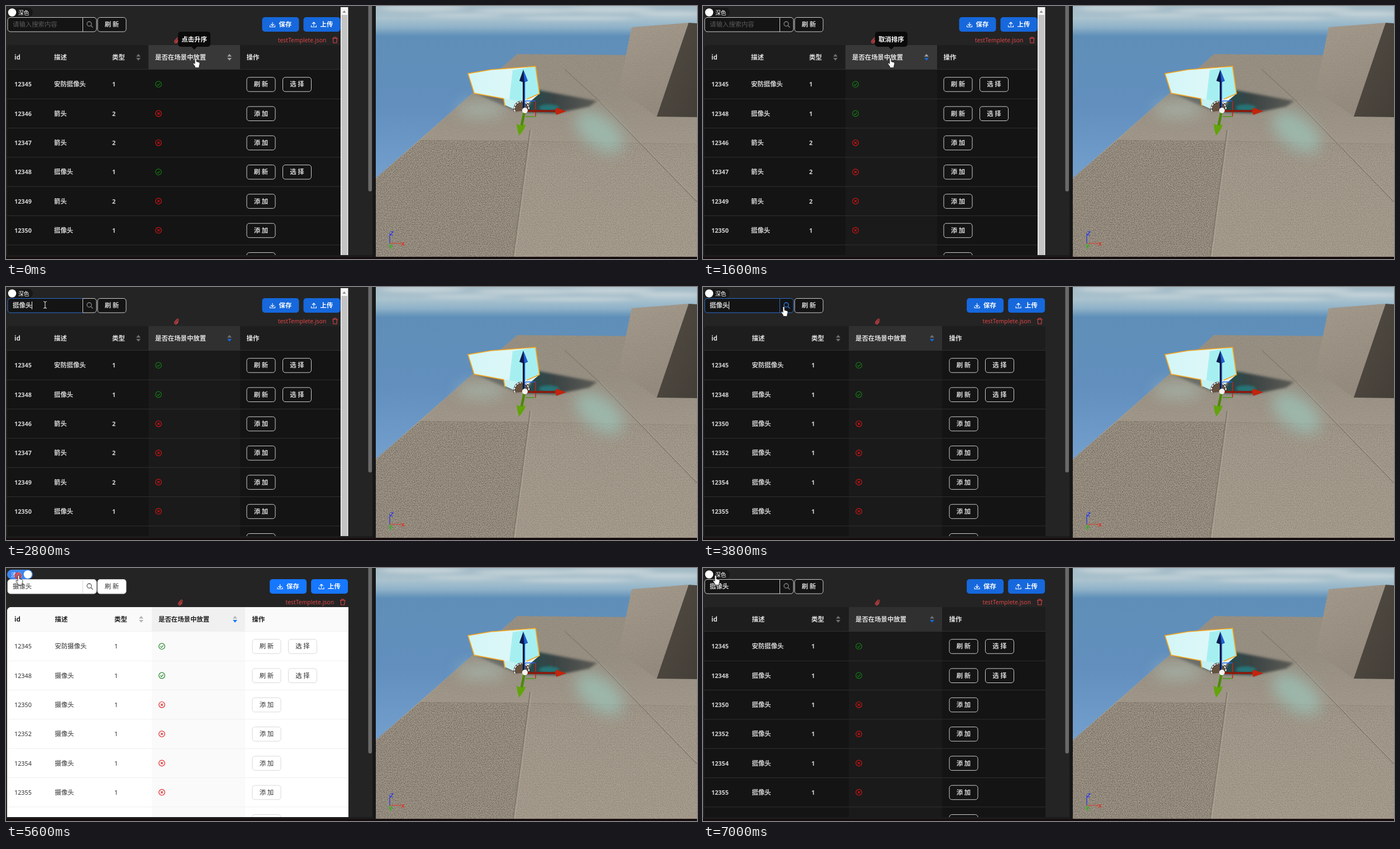
Animation of 1237 by 453 pixels, one loop 7.2 s. Source, as an HTML page:

```html
<!DOCTYPE html>
<html lang="zh">
<head>
<meta charset="utf-8">
<title>Scene table</title>
<style>
html, body { margin: 0; width: 100%; height: 100%; overflow: hidden; background: #242424; }
svg { display: block; width: 100vw; height: 100vh; }
text { font-family: "Noto Sans CJK SC", "Noto Sans CJK", "Noto Sans", sans-serif; font-size: 11.4px; white-space: pre; }
text.num { font-family: "Noto Sans", sans-serif; font-size: 10.8px; }
text.file { font-family: "Noto Sans", sans-serif; font-size: 10.4px; }
</style>
</head>
<body>
<svg viewBox="0 0 1237 453" preserveAspectRatio="none">
  <defs>
    <clipPath id="view"><rect x="662" width="575" height="449"/></clipPath>
    <clipPath id="page"><rect width="647" height="446"/></clipPath>
    <linearGradient id="sky" x1="0" y1="0" x2="0" y2="1">
      <stop offset="0" stop-color="#a3bac5"/><stop offset=".05" stop-color="#a9c2ce"/>
      <stop offset=".085" stop-color="#8fb2c8"/><stop offset=".12" stop-color="#5f8fb8"/>
      <stop offset=".4" stop-color="#628fbe"/><stop offset=".7" stop-color="#74a0ce"/>
    </linearGradient>
    <linearGradient id="floor" x1="0" y1=".19" x2="0" y2="1">
      <stop offset="0" stop-color="#9a9285"/><stop offset=".4" stop-color="#a79e90"/>
      <stop offset="1" stop-color="#aba192"/>
    </linearGradient>
    <linearGradient id="block" x1="0" y1="0" x2=".3" y2="1">
      <stop offset="0" stop-color="#a79d8f"/><stop offset="1" stop-color="#978d80"/>
    </linearGradient>
    <linearGradient id="side" x1="0" y1="0" x2="1" y2="1">
      <stop offset="0" stop-color="#544e46"/><stop offset="1" stop-color="#443f38"/>
    </linearGradient>
    <linearGradient id="mesh"><stop offset="0" stop-color="#d3f6f7"/><stop offset="1" stop-color="#e4f8f9"/></linearGradient>
    <linearGradient id="shade">
      <stop offset="0" stop-color="#1f4a4e"/><stop offset=".4" stop-color="#3a4343"/><stop offset="1" stop-color="#5d5c56"/>
    </linearGradient>
    <filter id="grain" x="0" y="0" width="1" height="1" color-interpolation-filters="sRGB">
      <feTurbulence type="fractalNoise" baseFrequency=".8" numOctaves="1" seed="4"/>
      <feColorMatrix values="0 0 0 0 .2  0 0 0 0 .17  0 0 0 0 .14  0 2.4 0 0 -1.05"/>
      <feComposite operator="in" in2="SourceAlpha"/>
    </filter>
    <filter id="b2" x="-20%" y="-30%" width="140%" height="160%"><feGaussianBlur stdDeviation="2"/></filter>
    <filter id="b9" x="-60%" y="-90%" width="220%" height="280%"><feGaussianBlur stdDeviation="13"/></filter>
    <filter id="cloud" x="-20%" y="-200%" width="140%" height="500%"><feGaussianBlur stdDeviation="9 3"/></filter>
  </defs>
  <g clip-path="url(#view)">
    <rect x="662" width="575" height="449" fill="url(#sky)"/>
    <g filter="url(#cloud)" fill="#d3dcdf" opacity=".65">
      <ellipse cx="745" cy="4" rx="75" ry="6"/><ellipse cx="930" cy="8" rx="90" ry="5"/>
      <ellipse cx="1080" cy="6" rx="80" ry="6"/><ellipse cx="1190" cy="14" rx="60" ry="5"/>
      <ellipse cx="820" cy="17" rx="70" ry="3"/><ellipse cx="1020" cy="22" rx="100" ry="3"/>
    </g>
    <path d="M915 86L1237 89V449H662V308Z" fill="url(#floor)"/>
    <path d="M742 240L936 241L908 449H662V308Z" fill="#a1988a"/>
    <g filter="url(#grain)">
      <path d="M915 86L1237 89V247L742 240Z" opacity=".2"/>
      <path d="M742 240L936 241L908 449H662V308Z" opacity=".75"/>
      <path d="M936 241L1237 247V449H908Z" opacity=".4"/>
    </g>
    <path d="M742 240L1237 247" stroke="#8d8578" stroke-opacity=".5"/>
    <path d="M938 222L908 449" fill="none" stroke="#7c7468" stroke-width="1.5"/>
    <path d="M941 222L911 449" fill="none" stroke="#bdb4a5" stroke-opacity=".6"/>
    <path d="M1000 113L1062 170L1237 351" fill="none" stroke="#827a6e" stroke-width="1.4"/>
    <path d="M1064 170L1237 348" stroke="#bdb4a5" stroke-opacity=".5"/>
    <ellipse cx="1062" cy="225" rx="50" ry="28" transform="rotate(38 1062 225)" fill="#9cc9be" opacity=".65" filter="url(#b9)"/>
    <ellipse cx="850" cy="185" rx="45" ry="14" fill="#b0cdc5" opacity=".5" filter="url(#b9)"/>
    <path d="M840 156L893 164L918 190L890 178Z" fill="#5b605d" opacity=".75" filter="url(#b2)"/>
    <path d="M950 150L1058 170L1044 180L985 192L930 190Z" fill="url(#shade)" filter="url(#b2)"/>
    <ellipse cx="972" cy="182" rx="18" ry="6" fill="#248083" opacity=".8" filter="url(#b2)"/>
    <path d="M1120 38L1222 30L1165 198L1097 150Z" fill="url(#block)"/>
    <path d="M1222 30L1237 31V199L1165 198Z" fill="url(#side)"/>
    <path d="M1120 38L1222 30L1237 31V199L1165 198L1097 150Z" filter="url(#grain)" opacity=".2"/>
    <path d="M827 121L868 114L948 108L955 157L918 188L893 177L891 166L838 156Z" fill="url(#mesh)"/>
    <path d="M907 115L948 108L955 157L918 171L901 167Z" fill="#a6eff1"/>
    <path d="M891 166L901 167L918 171L930 168L918 188L893 177Z" fill="#c4f1f2"/>
    <path d="M893 179L891 166L838 156L827 121L868 114L948 108L955 157L932 167" fill="none" stroke="#f4a51c" stroke-width="1.7"/>
    <path d="M911 189A13 13 0 1 1 936 186L929 188Z" fill="#65503f"/>
    <path d="M911 189A13 13 0 1 1 936 186" fill="none" stroke="#201c18" stroke-width="3.200"/>
    <path d="M911 189A13 13 0 1 1 936 186" fill="none" stroke="#fff" stroke-width="2" stroke-dasharray="4 1.2"/>
    <path d="M930 170H948" stroke="#2060e8" stroke-width="1.5"/>
    <path d="M948 170V198" stroke="#d01e10" stroke-width="1.5"/>
    <path d="M930 198H948" stroke="#4c9a14" stroke-width="1.5"/>
    <path d="M927 134V185" stroke="#0b1738" stroke-width="4"/>
    <path d="M928.5 134V183" stroke="#1c58cc" stroke-width="1.5"/>
    <path d="M926 114L919 134L927 137L934 134Z" fill="#0c1c4c"/>
    <path d="M926 114L928 136L934 134Z" fill="#205fd8"/>
    <path d="M932 188H986" stroke="#8e1608" stroke-width="3.5"/>
    <path d="M1003 188.500L985 182L983 188L985 195Z" fill="#c2240c"/>
    <path d="M928 190L923 214" stroke="#4c8908" stroke-width="4.5"/>
    <path d="M914 211L922 214L930 212L928 219L919 232L916 224Z" fill="#62a40a"/>
    <circle cx="929" cy="187" r="5" fill="#f4f4f2"/>
    <g fill="none" stroke-width="1.2">
      <path d="M687 425V407M688 404H693L688 410H693" stroke="#2436e8"/>
      <path d="M687 425H707M708 423L713 429M713 423L708 429" stroke="#e03424"/>
      <path d="M685 428L688 431L692 428M688 431V435M687 425L690 434" stroke="#35b024"/>
    </g>
  </g>
  <path d="M656 0H662V449H656Z" fill="#171717"/>
  <rect x="648.500" y="-8" width="6.500" height="340" rx="3" fill="#6a6a6a"/>
  <g id="ui" clip-path="url(#page)"></g>
  <path d="M0 446H656V449H0Z" fill="#1b1b1b"/>
  <path d="M0 449.500H1237V453H0Z" fill="#150b0c"/>
  <g id="pointer"></g>
</svg>
<script>
const LOOP = 7200, STEP = 200;
const ui = document.getElementById('ui'), pointer = document.getElementById('pointer');

const CAMERA = '摄像头', ARROW = '箭头';
const items = Array.from({ length: 14 }, (_, i) => {
  const arrow = [1, 2, 4, 6, 8].includes(i);
  return {
    id: 12345 + i, name: i ? (arrow ? ARROW : CAMERA) : '安防' + CAMERA,
    type: arrow ? 2 : 1, placed: i === 0 || i === 3
  };
});

const darkTheme = {
  body: '#141414', head: '#1d1d1d', hot: '#303030', col: '#1a1a1a', line: '#303030',
  text: '#d4d4d4', title: '#e0e0e0', edge: '#cfcfcf', weight: 600, blue: '#1668dc',
  caret: '#707070', good: '#147a14', bad: '#d41414', hint: '#5a5a5a', icon: '#858585'
};
const lightTheme = {
  body: '#ffffff', head: '#fafafa', hot: '#f0f0f0', col: '#fafafa', line: '#f0f0f0',
  text: '#303030', title: '#202020', edge: '#d9d9d9', weight: 400, blue: '#1677ff',
  caret: '#b4b4b4', good: '#258a2c', bad: '#dc2626', hint: '#bbbbbb', icon: '#606060'
};

const rect = (x, y, w, h, fill, more = '') =>
  `<rect x="${x}" y="${y}" width="${w}" height="${h}" fill="${fill}" ${more}/>`;
const text = (x, cy, s, fill, more = '') =>
  `<text x="${x}" y="${cy + 4.2}" fill="${fill}" ${more}>${s}</text>`;
const line = (d, color, w = 1.1, more = '') =>
  `<path d="${d}" fill="none" stroke="${color}" stroke-width="${w}" ${more}/>`;

function button(x, cy, label, c) {
  return rect(x + .5, cy - 12.5, 51, 25.5, c.body, `rx="4.5" stroke="${c.edge}"`) +
    text(x + 26, cy, label, c.text, `text-anchor="middle" font-weight="${c.weight}"`);
}

function blueButton(x, label, c, up) {
  const d = up ? 'M0 3V-4M-3 -1L0 -4L3 -1' : 'M0 -4V2.500M-3 -.5L0 2.500L3 -.5';
  return rect(x, 20, 66, 26, c.blue, 'rx="5"') +
    `<g transform="translate(${x + 18.5} 33)">${line(d + 'M-4.500 1.500V4.500H4.500V1.500', '#fff')}</g>` +
    text(x + 30, 33, label, '#fff', 'font-weight="600"');
}

function sorter(x, c, order, hover) {
  const off = hover ? '#a0a0a0' : c.caret;
  const tint = side => order === side ? c.blue : off;
  return `<path d="M${x - 4} 90.500h8l-4 -4.700z" fill="${tint('up')}"/>` +
    `<path d="M${x - 4} 93h8l-4 4.700z" fill="${tint('down')}"/>`;
}

function mark(x, cy, ok, c) {
  const d = ok ? `M${x - 2.6} ${cy}l2 2.200l3.300 -4` : `M${x - 2} ${cy - 2}l4 4m0 -4l-4 4`;
  const color = ok ? c.good : c.bad;
  return `<circle cx="${x}" cy="${cy}" r="5.300" fill="none" stroke="${color}" stroke-width="1.2"/>` + line(d, color, 1.2);
}

function toggle(light) {
  const bg = light ? '#3d86ee' : '#171717';
  return rect(2, 3, 46, 17, bg, 'rx="8.500"') +
    `<circle cx="${light ? 39 : 11}" cy="11.500" r="7.300" fill="#fff"/>` +
    text(light ? 9 : 22, 11.5, light ? '浅色' : '深色', '#fff', 'style="font-size:9.800px"');
}

function searchBar(s, c) {
  const edge = s.focus ? '#2b6fd0' : c.edge;
  return `<path d="M137.500 20.500H8a5 5 0 0 0 -5 5V41a5 5 0 0 0 5 5H137.500Z" fill="${c.body}" stroke="${edge}"/>` +
    `<path d="M137.500 20.500H157a5 5 0 0 1 5 5V41a5 5 0 0 1 -5 5H137.500Z" fill="${c.body}" stroke="${s.hotSearch ? '#2b6fd0' : c.edge}"/>` +
    text(12, 33, s.query || '请输入搜索内容', s.query ? c.text : c.hint, s.query ? `font-weight="${c.weight}"` : '') +
    (s.caret ? line(`M${s.query ? 46.500 : 12.500} 26V40`, '#eee', 1) : '') +
    line('M152.200 35.200L155.500 38.500M153 32a4 4 0 1 0 -8 0a4 4 0 1 0 8 0', s.hotSearch ? '#2f7ae5' : c.icon, 1.3) +
    button(163.5, 33, '刷 新', c);
}

function fileRow(wide) {
  const x = wide ? 313 : 306, dx = wide ? 13.7 : 0, red = '#dc4446';
  return `<g transform="translate(${x} 61.500) rotate(40)">` +
    line('M2.500 -1V3A2.500 2.500 0 0 1 -2.500 3V-3A1.800 1.800 0 0 1 1 -3V2.500A.6 .6 0 0 1 -.8 2.500V-2', red) + '</g>' +
    text(486.7 + dx, 61, 'testTemplete.json', red, 'class="file"') +
    `<g transform="translate(${589 + dx} 61)">` + line('M-5 -3H5M-2 -3V-5H2V-3M-3.600 -3L-3 5H3L3.600 -3', red) + '</g>';
}

function tooltip(label) {
  return '<path d="M331 72H343L337 78Z" fill="#0a0a0a"/>' + rect(308, 46, 58, 27, '#0a0a0a', 'rx="5"') +
    text(337, 60, label, '#fff', 'text-anchor="middle" font-weight="600"');
}

function pageScroll() {
  return rect(599, 2, 13.5, 445, '#f4f4f4') + rect(600.5, 16, 10.5, 432, '#c4c4c4') +
    '<path d="M602.500 12h6l-3 -4z" fill="#888"/>';
}

function rowsFor(s) {
  const list = s.filter ? items.filter(r => r.name.includes(CAMERA)) : items.slice();
  const dir = { up: 1, down: -1 }[s.order] || 0;
  return list.sort((a, b) => dir * (a.placed - b.placed)).slice(0, 7);
}

function table(s, c) {
  const wide = s.filter;
  const x = wide ? { name: 87.5, type: 194, col: 261, end: 428, icon: 279, act: 440.5, right: 613, s1: 242, s2: 410 }
    : { name: 86, type: 190, col: 255, end: 419, icon: 273, act: 430.5, right: 599, s1: 237, s2: 400 };
  const bold = 'font-weight="700"';
  let out = `<path d="M2 447V77a7 7 0 0 1 7 -7H${x.right}V447Z" fill="${c.body}"/>` +
    `<path d="M2 114V77a7 7 0 0 1 7 -7H${x.right}V114Z" fill="${c.head}"/>` +
    rect(x.col, 70, x.end - x.col, 44, s.tip && c === darkTheme ? '#383838' : c.hot);
  if (s.order) out += rect(x.col, 114, x.end - x.col, 333, c.col);
  out += line(`M2 113.500H${x.right}`, c.line, 1);
  const titles = [[15, 'id'], [x.name, '描述'], [x.type, '类型'], [x.icon - 6, '是否在场景中放置'], [x.act, '操作']];
  out += titles.map(([px, label]) => text(px, 92, label, c.title, bold)).join('') +
    sorter(x.s1, c) + sorter(x.s2, c, s.order, s.tip);
  rowsFor(s).forEach((r, i) => {
    const cy = 140.2 + 52.3 * i, w = `font-weight="${c.weight}"`;
    out += text(15, cy, r.id, c.text, 'class="num" ' + w) + text(x.name, cy, r.name, c.text, w) +
      text(x.type, cy, r.type, c.text, 'class="num" ' + w) + mark(x.icon, cy, r.placed, c) +
      button(x.act, cy, r.placed ? '刷 新' : '添 加', c) +
      (r.placed ? button(x.act + 64.5, cy, '选 择', c) : '') +
      line(`M2 ${cy + 26.1}H${x.right}`, c.line, 1);
  });
  return out;
}

function stateAt(t) {
  return {
    order: t < 600 ? '' : t < 1200 ? 'up' : 'down',
    tip: t < 600 ? '点击升序' : t < 1200 ? '点击降序' : t < 1800 ? '取消排序' : '',
    query: t < 2600 ? '' : CAMERA,
    focus: t >= 2200 && t < 5200,
    caret: t >= 2200 && t < 5200 && (t + 300) % 1000 < 500,
    hotSearch: t >= 3400 && t < 4000,
    filter: t >= 3600,
    light: t >= 5200 && t < 6000
  };
}

function paint(s) {
  const c = s.light ? lightTheme : darkTheme, dx = s.filter ? 13.6 : 0;
  ui.innerHTML = toggle(s.light) + searchBar(s, c) + blueButton(458.5 + dx, '保存', c) +
    blueButton(532.5 + dx, '上传', c, true) + fileRow(s.filter) + table(s, c) +
    (s.filter ? '' : pageScroll()) + (s.tip ? tooltip(s.tip) : '');
}

// time, x, y
const path = [
  [0, 341, 102], [600, 339, 102], [1600, 337, 102], [1800, 330, 100], [2200, 70, 32],
  [3000, 70, 32], [3400, 146, 44], [3800, 146, 44], [4400, 24, 22], [LOOP, 24, 22]
];

function place(t) {
  const i = path.findIndex(p => p[0] > t);
  const [a, b] = [path[i - 1], path[i]], k = (t - a[0]) / (b[0] - a[0]);
  return [a[1] + (b[1] - a[1]) * k, a[2] + (b[2] - a[2]) * k];
}

const HAND = 'M-3 -7.500a1.500 1.500 0 0 1 3 0V-2.500l4.500 1.200Q6 -.6 6 1.500L4.800 5.500V8.500H-2.500V6.500L-6 1.500Q-6.500 -.5 -4.500 0L-3 1.500Z';
const ARROW_TIP = 'M-4 -8V6L-.5 3L2 8.500L4 7.500L1.700 2.500H6Z';

function paintPointer(t) {
  const [x, y] = place(t);
  const beam = t >= 2200 && t <= 3000;
  const moving = (t > 1600 && t < 2200) || (t > 3000 && t < 3400) || (t > 3800 && t < 4400);
  const shape = beam ? line('M-3 -6Q0 -6 0 -4Q0 -6 3 -6M0 -5V5M-3 6Q0 6 0 4Q0 6 3 6', '#ddd', 1.1)
    : `<path d="${moving ? ARROW_TIP : HAND}" fill="#fff" stroke="#111" stroke-width=".8"/>`;
  const ring = t === 5600 ? '<circle cx="-2.500" cy="-8" r="5.500" fill="#e03030" fill-opacity=".65" stroke="#d83a3a" stroke-width="1.500"/>' : '';
  pointer.innerHTML = `<g transform="translate(${x} ${y})">${ring}${shape}</g>`;
}

let last = -1;
function render(now) {
  const t = Math.floor(now % LOOP / STEP) * STEP;
  if (t !== last) {
    last = t;
    paint(stateAt(t));
    paintPointer(t);
  }
}

const start = performance.now();
function tick() {
  render(performance.now() - start);
  requestAnimationFrame(tick);
}
tick();
</script>
</body>
</html>
```
